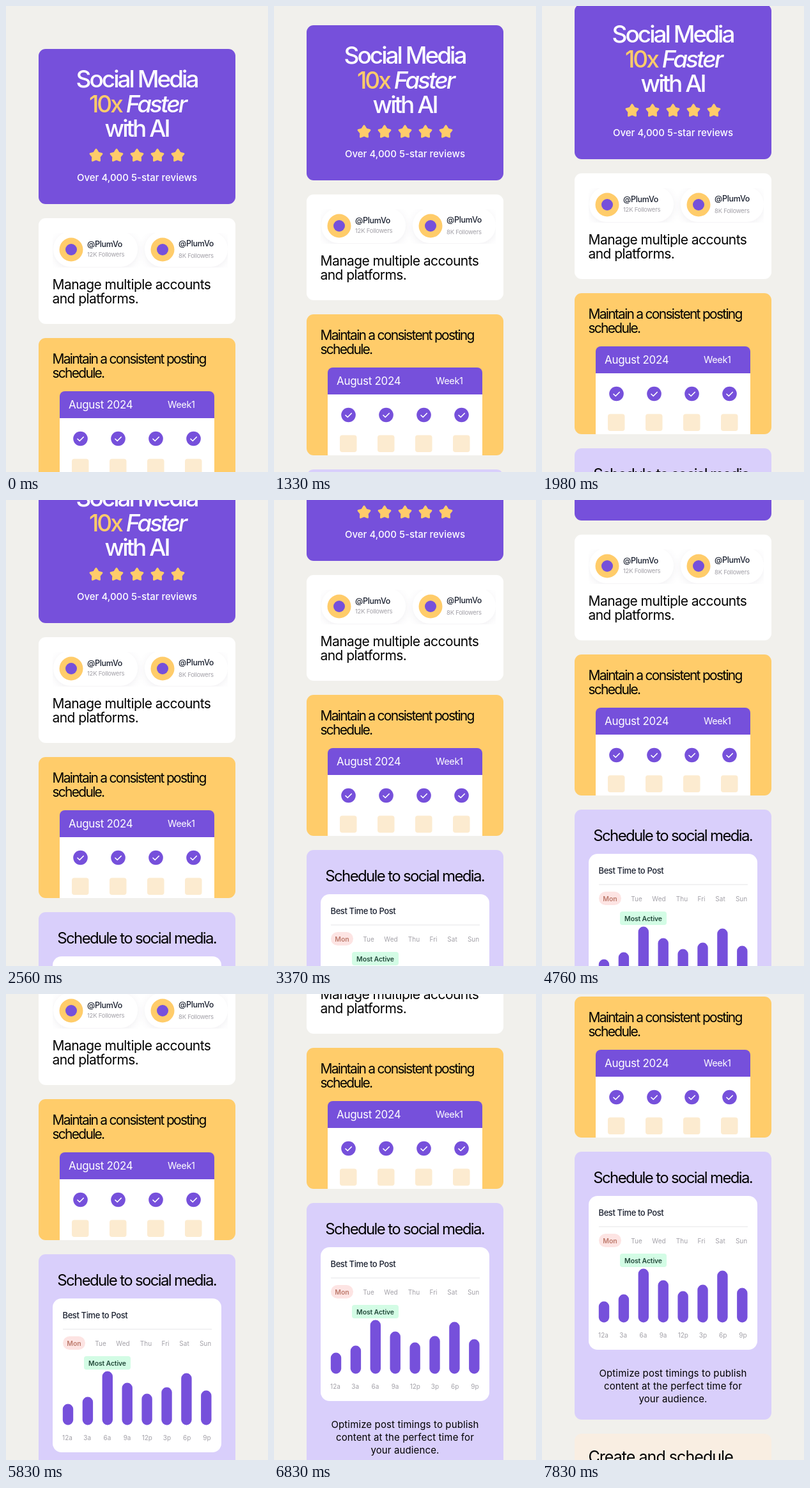
An HTML page that plays this animation: 410x727 px, repeating every 8 s.

```html
<!DOCTYPE html>
<html lang="en">
<head>
<meta charset="utf-8">
<title>Social media planner</title>
<style>
  html, body { margin: 0; width: 100%; height: 100%; overflow: hidden; background: #f1f0ec; }
  svg { display: block; width: 100%; height: 100%; font-family: Inter, sans-serif; }
  .pill { filter: drop-shadow(0 3px 6px #2a1a4012); }
</style>
</head>
<body>
<svg viewBox="0 0 410 727">
  <clipPath id="strip"><rect x="73" y="354" width="274" height="54"/></clipPath>
  <g id="page"></g>
</svg>
<script>
const PURPLE = '#7650db', YELLOW = '#ffcc6a', GREY = '#a3a1a8', INK = '#1b2130';
const page = document.getElementById('page');

const rect = (x, y, w, h, r, fill, extra = '') =>
  `<rect x="${x}" y="${y}" width="${w}" height="${h}" rx="${r}" fill="${fill}" ${extra}/>`;
const disc = (x, y, r, fill) => `<circle cx="${x}" cy="${y}" r="${r}" fill="${fill}"/>`;
const card = (y, h, fill) => rect(51, y, 308, h, 11, fill);
const text = (s, x, y, size, { fill = '#000', gap = 0, weight = 400, mid = false } = {}) =>
  `<text x="${x}" y="${y}" font-size="${size}" fill="${fill}" letter-spacing="${gap}" ` +
  `font-weight="${weight}" text-anchor="${mid ? 'middle' : 'start'}">${s}</text>`;

function star(cx, cy) {
  const pts = Array.from({ length: 10 }, (_, i) => {
    const r = i % 2 ? 5.4 : 9.4, a = Math.PI * (i / 5 - 0.5);
    return `${(cx + r * Math.cos(a)).toFixed(2)},${(cy + r * Math.sin(a)).toFixed(2)}`;
  });
  return `<polygon points="${pts.join(' ')}" fill="${YELLOW}" stroke="${YELLOW}" ` +
    `stroke-width="3" stroke-linejoin="round"/>`;
}

function hero() {
  const o = { fill: '#fff', gap: -3, weight: 500, mid: true };
  return card(67, 242, PURPLE) +
    text('Social Media', 204.5, 127, 37, o) +
    text(`<tspan fill="${YELLOW}">10x</tspan> <tspan font-style="italic">Faster</tspan>`, 205.5, 165.5, 37, o) +
    text('with AI', 204.5, 204, 37, o) +
    [0, 1, 2, 3, 4].map(i => star(141 + 32 * i, 233.5)).join('') +
    text('Over 4,000 5-star reviews', 205, 273, 15, { fill: '#fff', weight: 500, mid: true });
}

function account(x, count, nameY, countY) {
  return disc(x, 380, 18.5, YELLOW) + disc(x, 380, 9, PURPLE) +
    text('@PlumVo', x + 25, nameY, 12.5, { fill: INK, gap: -0.3, weight: 500 }) +
    text(count + ' Followers', x + 25, countY, 9.5, { fill: GREY, gap: -0.25 });
}

function accounts() {
  return card(331, 165, '#fff') +
    '<g clip-path="url(#strip)">' +
    rect(74, 352, 132, 55, 27, '#fff', 'class="pill"') +
    rect(217, 352, 130, 55, 27, '#fff', 'class="pill"') + '</g>' +
    account(102, '12K', 376, 391) + account(245, '8K', 374.5, 393) +
    text('Manage multiple accounts', 72.5, 442, 21, { gap: -0.56 }) +
    text('and platforms.', 72.5, 464, 21, { gap: -0.56 });
}

function calendar() {
  const days = [116.5, 175.5, 234.5, 293.5].map(x =>
    disc(x, 675, 11.3, PURPLE) +
    `<path d="M${x - 4.5} 675.5l3.2 3 6-6" fill="none" stroke="#fff" stroke-width="1.7" ` +
    `stroke-linecap="round" stroke-linejoin="round"/>` +
    rect(x - 13.5, 706.5, 26.5, 26.5, 4, '#fcebd0')).join('');
  return card(518, 220, YELLOW) +
    text('Maintain a consistent posting', 72.5, 558, 21, { gap: -1.73 }) +
    text('schedule.', 72.5, 580, 21, { gap: -1.73 }) +
    rect(84, 601, 242, 60, 8, PURPLE) + rect(84, 643, 242, 95, 0, '#fff') +
    text('August 2024', 98, 628, 17, { fill: '#fff', gap: -0.3 }) +
    text('Week1', 253, 627, 14.5, { fill: '#fff', gap: -0.35 }) + days;
}

function chart() {
  const days = [['Tue', 148], ['Wed', 183], ['Thu', 219], ['Fri', 249.5], ['Sat', 279], ['Sun', 312]];
  const hours = ['12a', '3a', '6a', '9a', '12p', '3p', '6p', '9p'];
  const heights = [33, 44, 84, 66, 49, 59, 81, 54];
  const small = { fill: GREY, mid: true };
  return card(760, 418, '#d9cffb') +
    text('Schedule to social media.', 204.7, 809, 24, { gap: -1.65, mid: true }) +
    rect(73, 829, 264, 240, 14, '#fff') +
    text('Best Time to Post', 88.5, 860, 13, { fill: INK, gap: -0.4, weight: 500 }) +
    rect(89, 876.5, 233, 1, 0, '#e6e5e8') +
    rect(89, 888, 35, 21, 10.5, '#fde4e3') +
    text('Mon', 106.5, 902.5, 10.5, { fill: '#bd7a6c', weight: 600, mid: true }) +
    days.map(([d, x]) => text(d, x, 902.5, 10, small)).join('') +
    rect(122, 919, 73, 21, 4, '#d3fce5') +
    text('Most Active', 158.5, 933.5, 10.5, { fill: '#234a3b', gap: -0.15, weight: 600, mid: true }) +
    heights.map((h, i) => {
      const x = 97 + 30.9 * i;
      return rect(x - 8.2, 1026.5 - h, 16.4, h, 8.2, PURPLE) +
        text(hours[i], 96 + 31.2 * i, 1049.5, 10, small);
    }).join('') +
    ['Optimize post timings to publish', 'content at the perfect time for', 'your audience.']
      .map((s, i) => text(s, 205, 1111 + 20 * i, 15, { gap: 0.13, mid: true })).join('');
}

page.innerHTML = hero() + accounts() + calendar() + chart() +
  card(1200, 200, '#f9eee2') + text('Create and schedule', 72.5, 1245, 25, { gap: -0.95 });

// Scroll position over time; the page only moves at the ticks.
const LOOP = 8000;
const path = [[0, 0], [310, 0], [880, 30], [1330, 37], [1530, 60], [1820, 70], [2560, 117], [3370, 214],
  [3960, 250], [4760, 277], [4970, 283], [5390, 296], [5830, 354], [7830, 514]];
const ticks = [0, 500, 690, 880, 1330, 1530, 1820, 2010, 2200, 2380, 2560, 2770, 2960, 3170, 3370, 3620,
  3790, 3960, 4160, 4360, 4560, 4760, 4970, 5390, 5550, 5690, 5830];
for (let t = 6030; t <= 7830; t += 200) ticks.push(t);

function scrollAt(t) {
  const i = Math.max(1, path.findIndex(p => p[0] >= t));
  const [t0, y0] = path[i - 1], [t1, y1] = path[i];
  return Math.round(y0 + (y1 - y0) * (t - t0) / (t1 - t0));
}

function draw() {
  const now = performance.now() % LOOP;
  const tick = ticks.filter(t => t <= now).pop();
  page.setAttribute('transform', `translate(0 ${-scrollAt(tick)})`);
  requestAnimationFrame(draw);
}
draw();
</script>
</body>
</html>
```
